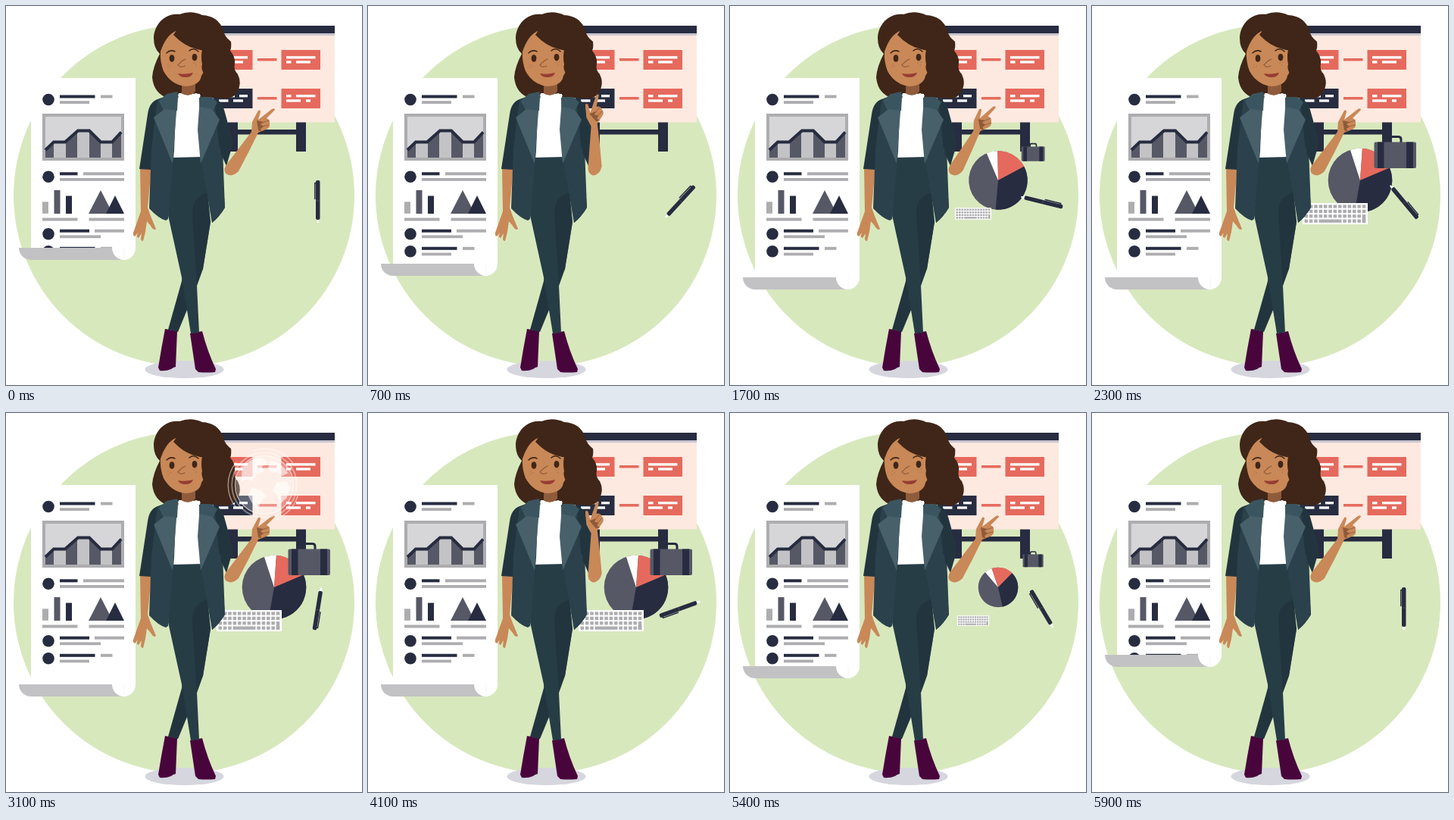
Recreate the animation shown at these times as an HTML page. Size 470 px wide and 500 px high, loop 6000 ms.

```html
<!DOCTYPE html>
<html lang="en">
<head>
<meta charset="utf-8">
<title>Presentation</title>
<style>
html, body { margin: 0; width: 100%; height: 100%; overflow: hidden; background: #fff; }
svg { display: block; width: 470px; height: 500px; }
.navy { fill: #272c40; }
.slate { fill: #565866; }
.grey { fill: #adadb0; }
.light { fill: #c3c3c5; }
.red { fill: #e56a5d; }
.white { fill: #fff; }
.skin { fill: #c98857; }
.shade { fill: #8d5b3a; }
.hair { fill: #3f2618; }
.suit { fill: #2b414b; }
.dark { fill: #22353e; }
.collar { fill: #3b5560; }
.lapel { fill: #48606a; }
.boot { fill: #48053c; }
.line { fill: none; stroke-linecap: round; stroke-linejoin: round; }
</style>
</head>
<body>
<svg viewBox="0 0 470 500" xmlns="http://www.w3.org/2000/svg">
  <defs><clipPath id="cut"><rect id="cutBox" x="33" y="95" width="138" height="224"/></clipPath></defs>
  <circle cx="235" cy="250" r="225" fill="#d8e8bd"/>

  <g id="easel">
    <path class="navy" d="M293 150h13v42h-13zM383 150h13v42h-13zM300 163h90v6.500h-90z"/>
    <path fill="#fde9e0" d="M278 39h156v114.500h-156z"/>
    <path class="navy" d="M265 26h169v10h-169z"/>
    <path fill="#c9c5cf" d="M265 36h169v3h-169z"/>
    <path class="red" d="M274 58h51.500v26h-51.500zM363.500 58h51.500v26h-51.500zM363.500 109h51.500v26h-51.500zM332 69h25.500v3.500h-25.500zM332 120h25.500v3.500h-25.500z"/>
    <path class="navy" d="M274 109h51.500v26h-51.500z"/>
    <g id="notes" class="white"></g>
  </g>

  <g id="pie">
    <circle class="slate" r="42.300"/>
    <g id="slices"></g>
  </g>
  <g id="bag">
    <path class="line" d="M393 181v-5q0-3.500 3.500-3.500h8q3.500 0 3.500 3.500v5" stroke="#272c40" stroke-width="3"/>
    <rect class="slate" x="372.500" y="179.500" width="55.500" height="34.500" rx="2"/>
    <path class="navy" d="M377 179.500h8.500v34.500h-8.500zM415 179.500h9v34.500h-9z"/>
  </g>
  <g id="keyboard">
    <path class="white" d="M278 260h86v28h-86z"/>
    <g id="keys" class="grey"></g>
  </g>
  <g id="pen">
    <path class="white" d="M409.500 280h4.500l-1.500 6.500h-1.500z"/>
    <rect class="navy" x="409" y="230" width="5.500" height="52" rx="2"/>
    <path d="M409 257h5.500" stroke="#565866" stroke-width=".7"/>
    <path class="line" d="M410 233.500h-2.200v21" stroke="#272c40" stroke-width="1.500"/>
  </g>

  <g id="paper">
    <rect id="sheet" class="white" x="33" y="95" width="138" height="225"/>
    <g clip-path="url(#cut)">
      <g id="report"></g>
      <path class="grey" d="M48 142h108v62h-108z"/>
      <path fill="#d6d6d8" d="M52 146h100v54h-100z"/>
      <path class="slate" d="M52 190l11-11v21h-11zM79 179l15-15v36h-15zM110 164l15 15v21h-15zM140 179l12-14v35h-12z"/>
      <path class="light" d="M63 179h16v21h-16zM94 164h16v36h-16zM125 179h15v21h-15z"/>
      <path d="M52 190l11-10.500h15l17-15h15l15 15h15l12-13" fill="none" stroke="#272c40" stroke-width="4"/>
      <path class="slate" d="M125 243l16 31h-32z"/>
      <path class="navy" d="M144 250l12 24h-24z"/>
    </g>
    <g id="curl">
      <path fill="#c2c2c4" d="M17 0h139v16h-123a16 16 0 0 1-16-16z"/>
      <path class="white" d="M140 -1v1a15.500 16 0 0 0 31 0v-1z"/>
      <path d="M156 0v15" stroke="#f1f1f2" stroke-width=".7"/>
    </g>
  </g>

  <ellipse cx="235.500" cy="479.500" rx="52" ry="11.500" fill="#d5d6de"/>
  <g id="woman">
    <path class="hair" d="M195 42C196 22 212 9 229 11Q244 5 259 12Q280 13 287 32Q288 40 297 47Q298 54 296 59Q303 67 302 76Q300 84 306 90Q312 102 305 114Q298 125 282 121L215 122Q195 116 193 94Q194 80 203 63Q195 56 195 42z"/>
    <path class="boot" d="M210 426l16 3-2 47q-4 1-6 3-7 3-15 2l-2-4 4-24z"/>
    <path class="dark" d="M246 240l20 5 4 40-10 62-9 25-24 58-13-3 18-64z"/>
    <path class="boot" d="M243 432l16-3q7 27 18 50l-1 4q-12 1-22 0l-4-4z"/>
    <path fill="#263d46" d="M220 198h38l9 48q-22 10-21 30l5 72 4 83-11 1-12-74-18-82z"/>
    <path class="skin" d="M177 213h15l-5 53 4 11q4 10 7 17-3 3-7-4l-5-6-2 14-3 12q-3 0-3-3l1-7-4 6q-3-1-2-4l1-3-4 5q-3-1-2-5l10-28z"/>
    <path class="dark" d="M200 123q-11 4-13 20l-11 72 16 1 8-40z"/>
    <path class="white" d="M228 115l28 1 4 83-41 1z"/>
    <path d="M232 99h18v14q-8 8-18 3z" fill="#8f5b3a"/>
    <path class="white" d="M227 117l4-2q9 6 20 0l6 3-5 7-11-6-10 7z"/>
    <path class="suit" d="M225 114l-25 9-8 65-3 79q12 13 22 16l3-2 8-90z"/>
    <path class="suit" d="M255 121l22 1 8 40 4 104q-8 13-17 20l-15-86z"/>
    <path class="dark" d="M275 122q10 3 13 15l12 43-9 31-9-20z"/>
    <path class="lapel" d="M227 117l-3 34-4 57-25-61 13-10-6-12z"/>
    <path class="collar" d="M226 113l-14 3-10 9 6 11 18 2 1-21z"/>
    <path class="lapel" d="M256 121l19 7-2 9 9 13-25 58-4-45z"/>
    <path class="collar" d="M256 120h15l8 7-5 10-18-4z"/>
    <path class="dark" d="M247 263q3-12 18-17l1 4 4 35-10 62-9 7z" opacity=".75"/>
    <path class="suit" d="M266 200l17-14 6 80q-8 13-17 20z"/>
    <path class="skin" d="M204 60Q211 39 224 33Q237 52 259 58Q257 67 259 77Q264 85 258 92Q256 105 237 106Q218 104 208 86Q203 73 204 60z"/>
    <path class="hair" d="M221 38Q235 53 252 57L266 60L262 72Q256 78 260 87Q266 93 257 101Q260 112 258 118L290 121L300 80L280 30L235 18z"/>
    <ellipse class="hair" cx="219" cy="69" rx="3.400" ry="4.800"/>
    <ellipse class="hair" cx="249" cy="67.700" rx="3.400" ry="4.800"/>
    <path class="line" d="M212 62q5-5 11-2M242 59q6-5 12 1" stroke="#3f2618" stroke-width="1.500"/>
    <path class="line" d="M237 70q-5 2-10 8 3 4 9 1" stroke="#8d5b3a" stroke-width="1.200"/>
    <path d="M227 89q9 2 20-1-2 6-10 6-8 0-10-5z" fill="#963d34"/>
    <path class="line" d="M214 77h.1M217 79h.1M214 81h.1M248 75h.1M252 74h.1M251 78h.1" stroke="#8d5b3a" stroke-width="1"/>
  </g>
  <g id="arm">
    <path class="skin" d="M324 166l1-13 8-15q3-2 3 2l-3 10 18-14q4-2 4 1l-11 11q5 2 4 7 1 6-5 8l-10 4q-12 25-26 51-9 9-17 3-4-6 2-13z"/>
    <path class="shade" d="M331 151l9 2-4 3 4 3-4 3 2 4-5-2z"/>
    <path class="line" d="M338 154l9-3M339 159l8-2" stroke="#8d5b3a" stroke-width=".8"/>
  </g>

  <g id="globe">
    <circle class="white" r="38" opacity=".28"/>
    <g class="line" stroke="#fff">
      <circle r="39" stroke-width="1.500" opacity=".65"/>
      <circle r="43.500" stroke-width="2" opacity=".4"/>
      <path d="M-38 -30A48 48 0 0 0-38 30M-15 -46A48 48 0 0 1 38 -30M45 14A48 48 0 0 1 15 46" stroke-width="1.500" opacity=".5"/>
    </g>
    <path class="white" opacity=".6" d="M-30 -22q10-15 27-14l8 6-8 5 2 7-9 3-6 10-8-3-7 5zM8 -33q16 3 24 17l-9 4-4-6-8 2-6-6zM-17 3l13 4 6 8-7 8-4 12-8-12-5-9zM17 -3l12-2 6 8-5 14-8 8-5-12-6-6z"/>
  </g>
</svg>
<script>
const $ = id => document.getElementById(id);
const bar = (x, y, w, h, c = '') => `<rect class="${c}" x="${x}" y="${y}" width="${w}" height="${h}"/>`;

// Board notes: row height, then start and end pairs
const note = (y, ...p) => {
  let s = '';
  for (let i = 0; i < p.length; i += 2) s += bar(p[i], y, p[i + 1] - p[i], 3.3);
  return s;
};
$('notes').innerHTML = note(66.2, 281, 319, 370, 408.5) + note(72.3, 281, 287, 294, 313, 370, 376.5, 383, 402) +
  note(117, 281, 302, 308, 319, 370, 376.5, 383, 408.5) + note(123.3, 281, 293.5, 300, 313, 370, 389, 396, 402);

// Report entries: top, end of heading, start and end of tail, end of second line
const entry = (y, head, tail, end, sub) => `<circle class="navy" cx="56" cy="${y + 6}" r="7.8"/>` +
  bar(71, y, head - 71, 4, 'navy') + bar(tail, y, end - tail, 4, 'grey') + bar(71, y + 7.7, sub - 71, 3.8, 'grey');
$('report').innerHTML = entry(117.5, 117.5, 125, 140.5, 110) + entry(219.3, 94.5, 102, 156, 156) +
  entry(294.7, 110, 117, 156, 125) + entry(317.8, 117.5, 125, 140.5, 110) +
  bar(48, 258.3, 8, 15.5, 'grey') + bar(63.5, 243, 8, 31, 'slate') + bar(79, 250.5, 8, 23.5, 'navy') +
  bar(48, 279.5, 46.5, 4, 'grey') + bar(109.5, 279.5, 46.5, 4, 'grey');

let keys = '';
for (let r = 0; r < 4; r++) {
  for (let c = 0; c < 13; c++) {
    if (r === 3 && c > 2 && c < 8) continue;
    keys += bar(280.5 + c * 6.35, 262.3 + r * 6.4, 4.6, r === 2 && c === 12 ? 10.6 : 4.3);
  }
}
$('keys').innerHTML = keys + bar(299.5, 281.5, 30, 4.3);

const slice = (a, b, c) => {
  const at = d => `${42.3 * Math.sin(d * Math.PI / 180)} ${-42.3 * Math.cos(d * Math.PI / 180)}`;
  return `<path class="${c}" d="M0 0L${at(a)}A42.3 42.3 0 0 1 ${at(b)}z"/>`;
};
$('slices').innerHTML = slice(-18, 4, 'white') + slice(4, 67, 'red') + slice(67, 190, 'navy');

const part = (t, a, b) => Math.min(1, Math.max(0, (t - a) / (b - a)));
const easeOut = u => 1 - (1 - u) ** 2;
const easeIn = u => u * u;
const wave = (t, peak) => (1 + Math.cos(Math.PI * Math.min(1, Math.abs(t - peak) / 950))) / 2;
const place = (id, s) => $(id).setAttribute('transform', s);
const show = (id, on) => $(id).setAttribute('visibility', on ? 'visible' : 'hidden');

// Scale a part about its own centre
const pop = (id, x, y, s) => {
  show(id, s > 0.001);
  place(id, `translate(${x} ${y}) scale(${s}) translate(${-x} ${-y})`);
};

function draw(t) {
  const edge = 319 + 39 * (part(t, 0, 1300) - part(t, 4600, 5900));
  $('cutBox').setAttribute('height', edge - 95);
  $('sheet').setAttribute('height', edge - 95);
  place('curl', `translate(0 ${edge})`);

  place('pen', `rotate(${360 * part(t, 0, 5900)} 411.7 258.3)`);

  const size = easeOut(part(t, 776, 2076)) - easeIn(part(t, 4600, 5900));
  show('pie', size > 0.001);
  place('pie', `translate(354 230) rotate(${-60 * (1 - size)}) scale(${size})`);

  const items = easeOut(part(t, 1500, 2100)) - easeIn(part(t, 4900, 5600));
  pop('bag', 400, 193, items);
  pop('keyboard', 321, 274, items);

  const swing = t < 20 ? 0 : wave(t, 925) + wave(t, 4325);
  place('arm', `rotate(${-38 * swing} 297 212)`);

  const glow = easeOut(part(t, 2400, 3200)) * (1 - part(t, 3300, 4000));
  show('globe', glow > 0.001);
  $('globe').setAttribute('opacity', glow);
  place('globe', `translate(341 95) scale(${easeOut(part(t, 2400, 3200)) * (1 - easeIn(part(t, 3300, 4000)))})`);
}

const start = performance.now();
function tick() {
  // Ten pictures a second
  draw(Math.floor((performance.now() - start) % 6000 / 100) * 100);
  requestAnimationFrame(tick);
}
tick();
</script>
</body>
</html>
```
